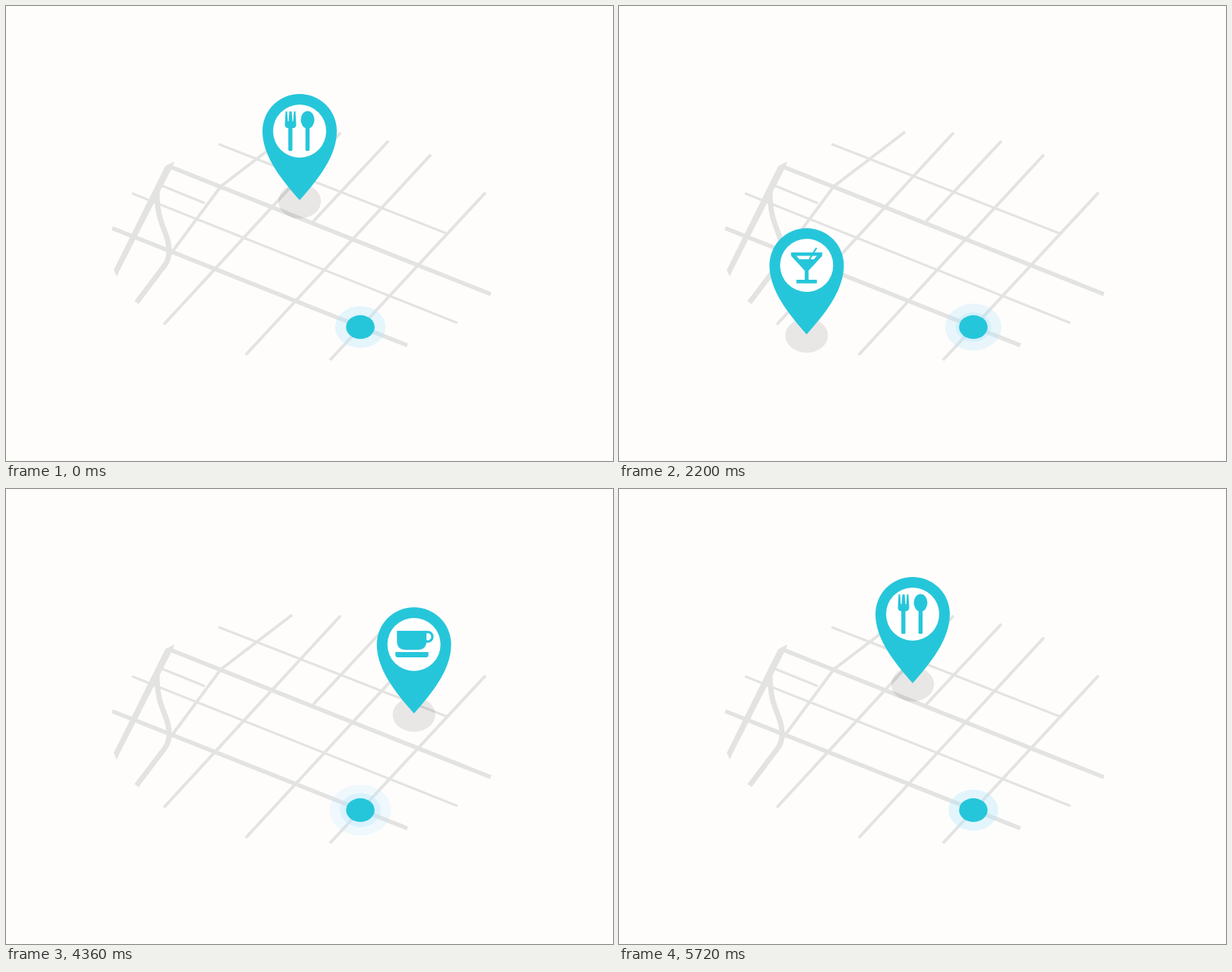
An HTML page that plays this animation: 800 by 600 pixels, repeating every 5.76 s.

```html
<!DOCTYPE html>
<html lang="en">
<head>
<meta charset="utf-8">
<title>Places nearby</title>
<style>
  html, body { margin: 0; width: 100%; height: 100%; overflow: hidden; background: #fefdfc; }
  svg { display: block; width: 800px; height: 600px; }
  .roads { fill: none; stroke: #e3e3e2; }
  .pin { fill: #26c6da; }
  .wave { fill: #b3e5fc; }
  .ripple { fill: none; stroke: #dededd; stroke-width: 2.8; }
</style>
</head>
<body>
<svg viewBox="0 0 800 600">
  <defs>
    <g id="body">
      <ellipse cy="1.5" rx="28.2" ry="22.8" fill="#000" opacity=".085"/>
      <path d="M0 0C-24 -27 -49 -58 -49 -91A49 49 0 0 1 49 -91C49 -58 24 -27 0 0Z"/>
      <circle cy="-91" r="35" fill="#fff"/>
    </g>
  </defs>

  <g class="roads">
    <path stroke-width="5.6" d="M140 293L529 447.5M214 211L639 380"/>
    <path stroke-width="7" d="M199 242C198 290 215 297 215 323C215 337 208 343 203 350L172 391"/>
    <path stroke-width="3.2" d="M280 182L581 300M166 247L595 418M203 236L262 260"/>
    <path stroke-width="4" d="M377 166L283 238L217 327M441 167L208 420M504 178L405 284M560 196L316 460M632 246L427 467"/>
    <path stroke="none" fill="#e3e3e2" d="M210 211L222 205L219 213L149 350L146 357L142 348Z"/>
  </g>

  <ellipse class="wave" cx="467" cy="423.4"/>
  <ellipse class="wave" cx="467" cy="423.4"/>
  <ellipse cx="467" cy="423.4" rx="18.8" ry="15.6" fill="#26c6da"/>

  <g class="place" transform="translate(387 256)" data-start="5260">
    <ellipse class="ripple" cy="2"/>
    <g class="pin">
      <use href="#body"/>
      <path d="M-18.5 -117h2l1 13h1l1 -13h3l1 13h1l1 -13h2l1 17q0 5 -4.5 5h-6q-4.5 0 -4.5 -5z"/>
      <rect x="-14.9" y="-98" width="5.4" height="33" rx="1.6"/>
      <ellipse cx="10.5" cy="-106" rx="9" ry="11.5"/>
      <rect x="7.7" y="-98" width="5.4" height="33" rx="1.6"/>
    </g>
  </g>

  <g class="place" transform="translate(247.3 433)" data-start="1420">
    <ellipse class="ripple" cy="2"/>
    <g class="pin">
      <use href="#body"/>
      <path d="M-20.5 -108H20.5V-103.5L2.5 -84V-72H13.5V-67.3H-13.5V-72H-2.5V-84L-20.5 -103.5Z"/>
      <path fill="#fff" d="M-13.5 -103.4H13.5L9.5 -99H-9.5Z"/>
      <path fill="none" stroke="#26c6da" stroke-width="2.2" d="M13 -114L3.5 -98.5"/>
    </g>
  </g>

  <g class="place" transform="translate(537.7 296)" data-start="3340">
    <ellipse class="ripple" cy="2"/>
    <g class="pin">
      <use href="#body"/>
      <path d="M-22.5 -109H16.5V-96Q16.5 -84 5.5 -84H-11.5Q-22.5 -84 -22.5 -96Z"/>
      <path fill="none" stroke="#26c6da" stroke-width="3.2" d="M16 -107.4H18A6.3 6.3 0 0 1 18 -94.8H15"/>
      <path d="M-24.5 -81H19V-77Q19 -74 16 -74H-21.5Q-24.5 -74 -24.5 -77Z"/>
    </g>
  </g>
</svg>
<script>
  const LOOP = 5760, BEAT = 960;
  const waves = document.querySelectorAll('.wave');
  const places = document.querySelectorAll('.place');
  const clamp = x => Math.max(0, Math.min(1, x));
  const easeOut = p => 1 - (1 - p) ** 2;

  function setEllipse(el, rx, ry, opacity) {
    el.setAttribute('rx', rx);
    el.setAttribute('ry', ry);
    el.setAttribute('opacity', opacity);
  }

  // Pop in past full size, settle, hold, then shrink into the tip.
  function pinScale(q) {
    if (q < 220) return 1.1 * easeOut(q / 220);
    if (q < 340) return 1.1 - 0.1 * (q - 220) / 120;
    return 1 - clamp((q - 1780) / 120) ** 1.5;
  }

  function draw(t) {
    // The older wave lies below the younger one.
    waves.forEach((wave, i) => {
      const age = t % BEAT + (1 - i) * BEAT;
      const r = 19.4 + 0.0143 * age;
      setEllipse(wave, r, r * 0.83, 0.35 * Math.min(1, (2 * BEAT - age) / 800));
    });

    places.forEach(place => {
      const [ripple, pin] = place.children;
      const q = (t - place.dataset.start + LOOP) % LOOP;
      pin.setAttribute('transform', `scale(${pinScale(q)})`);
      const p = clamp((q - 100) / 280);
      const r = 28 + 37 * easeOut(p);
      setEllipse(ripple, r, r * 0.71, p > 0 ? 1 - p * p : 0);
    });
  }

  const begin = performance.now();
  function tick() {
    draw((performance.now() - begin) % LOOP);
    requestAnimationFrame(tick);
  }
  tick();
</script>
</body>
</html>
```
